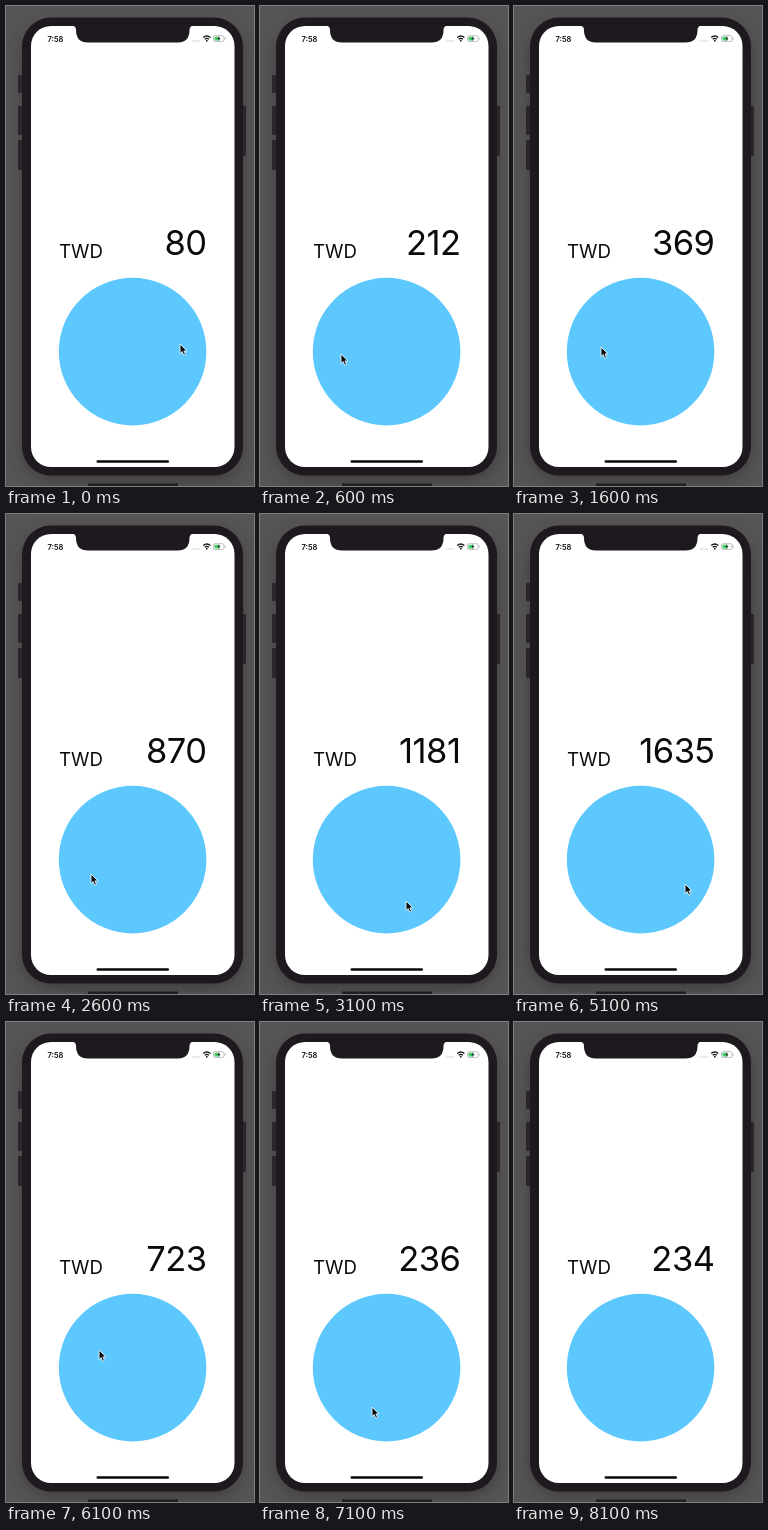
These frames come from a looping animation (248x480 px, 8.6 s). An HTML page:

```html
<!DOCTYPE html>
<html lang="en">
<head>
<meta charset="utf-8">
<title>Currency dial</title>
<style>
html, body { margin: 0; width: 100%; height: 100%; overflow: hidden; background: #575456; }
svg { display: block; width: 248px; height: 480px; }
text { font-family: Inter, "Liberation Sans", sans-serif; fill: #0b0b0d; }
</style>
</head>
<body>
<svg viewBox="0 0 248 480">
  <defs>
    <filter id="soft" x="-20%" y="-20%" width="140%" height="140%">
      <feGaussianBlur stdDeviation="7"/>
    </filter>
  </defs>
  <rect width="248" height="480" fill="#575456"/>
  <rect x="15" y="17" width="223" height="458" rx="32" fill="#2c292c" opacity=".5" filter="url(#soft)"/>
  <rect x="82" y="477.5" width="90" height="3" fill="#211d21"/>

  <g fill="#29252a">
    <rect x="12" y="69" width="6" height="18" rx="1"/>
    <rect x="12" y="100" width="6" height="29" rx="1"/>
    <rect x="12" y="134" width="6" height="30" rx="1"/>
    <rect x="235" y="100" width="5" height="50" rx="1"/>
  </g>
  <rect x="16" y="11.5" width="221" height="458" rx="29" fill="#1d191e"/>
  <rect x="25" y="20" width="203.5" height="441" rx="20" fill="#fff"/>
  <path d="M66 19.5Q70 20 70 24Q70 36.5 82 36.5H171.500Q183.500 36.500 183.500 24Q183.500 20 187.500 19.500Z" fill="#1d191e"/>

  <text x="41.500" y="35.500" font-size="7.500" font-weight="600">7:58</text>
  <path d="M186 35H194" stroke="#c4c4c6" stroke-width="1.200" stroke-dasharray="1.300 .9"/>
  <g fill="none" stroke="#171719" stroke-width="1.300">
    <path d="M197.200 31.500Q200.800 28.500 204.400 31.500"/>
    <path d="M198.700 33.200Q200.800 31.500 202.900 33.200"/>
  </g>
  <circle cx="200.800" cy="34.700" r=".9" fill="#171719"/>
  <rect x="207.500" y="29.700" width="10.500" height="5.800" rx="1.600" fill="#fff" stroke="#a5a5a8" stroke-width=".7"/>
  <rect x="208.500" y="30.700" width="5" height="3.800" rx=".7" fill="#45cf68"/>
  <path d="M213.300 30L211.300 33H212.900L212.300 35.200L214.500 32.200H212.900Z" fill="#222"/>
  <path d="M219.200 31.700V33.500" stroke="#a5a5a8" stroke-width=".8"/>

  <text x="53" y="252" font-size="18.700">TWD</text>
  <text id="amount" x="200.500" y="249" font-size="34.500" text-anchor="end" letter-spacing="-.5"></text>
  <circle cx="126.600" cy="345.600" r="73.800" fill="#5cc8fd"/>
  <rect x="90.500" y="454.300" width="72.500" height="2.500" rx="1.250" fill="#09090b"/>
  <path id="cursor" d="M0 0V9.600L2.200 7.600L3.700 11.200L5.500 10.400L4 6.900H7Z" fill="#0c0c0f" stroke="#e8f6ff" stroke-width=".9" stroke-linejoin="round"/>
</svg>
<script>
const LOOP = 8600, FIRST_HOLD = 100, HOLD = 500;

// Each pose: amount, pointer x, pointer y. A pose without a position hides the pointer.
const poses = [
  [80, 174, 338], [136, 164, 365], [212, 81, 348], [291, 150, 330],
  [369, 87, 341], [585, 90, 371], [870, 85, 360], [1181, 146, 387],
  [1480, 60, 352], [1777, 145, 401], [1820, 61, 362], [1635, 171, 370],
  [1190, 72, 395], [723, 93, 328], [420, 152, 372], [236, 112, 385],
  [234, 60, 353], [234]
];
const amount = document.getElementById("amount");
const cursor = document.getElementById("cursor");

function poseAt(time) {
  return poses[time < FIRST_HOLD ? 0 : 1 + Math.floor((time - FIRST_HOLD) / HOLD)];
}

function draw(time) {
  const [value, x, y] = poseAt(time);
  amount.textContent = value;
  cursor.style.display = x === undefined ? "none" : "";
  if (x !== undefined) cursor.setAttribute("transform", `translate(${x} ${y})`);
}

const start = performance.now();
function tick() {
  draw((performance.now() - start) % LOOP);
  requestAnimationFrame(tick);
}
draw(0);
requestAnimationFrame(tick);
</script>
</body>
</html>
```
